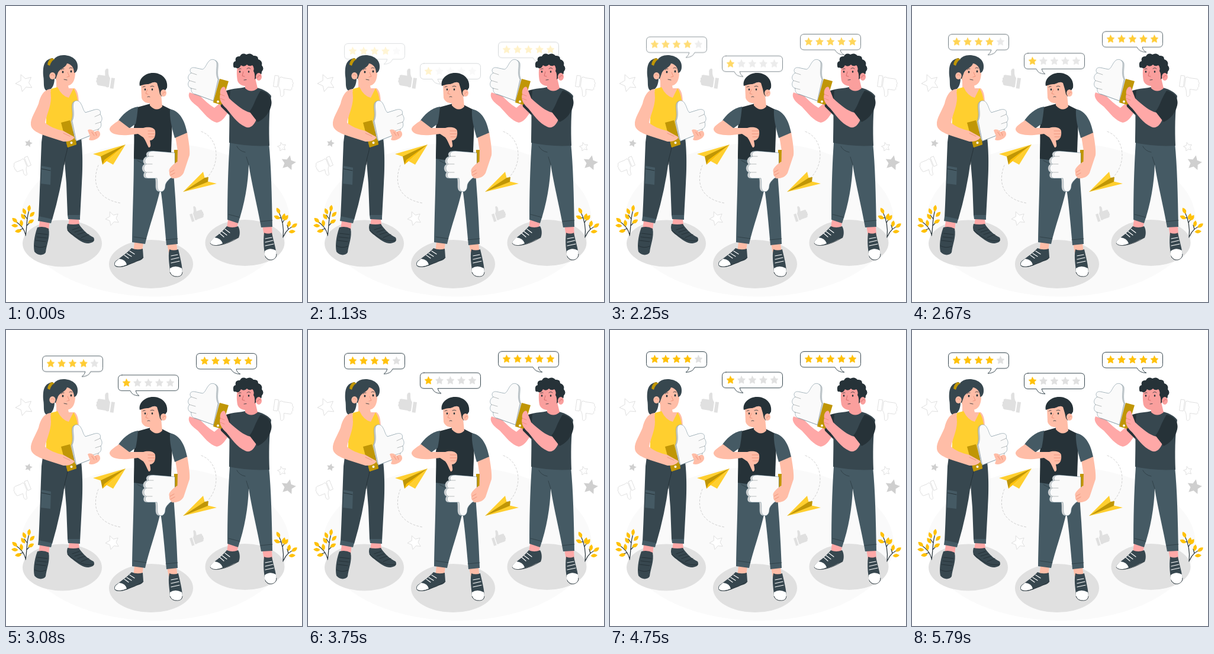
Write an HTML page without scripts that moves like this. It is 500 by 500 pixels and loops after 5.83 s.

```html
<!DOCTYPE html>
<html lang="en">
<head>
<meta charset="utf-8">
<title>Customer ratings</title>
<style>
html, body { margin: 0; width: 100%; height: 100%; overflow: hidden; background: #fff; }
svg { display: block; width: 100vw; height: 100vh; }
path, ellipse, use { stroke-linecap: round; stroke-linejoin: round; }
.floor { fill: #fafafa; }
.grey { fill: #e0e0e0; }
.silver { fill: #cfcfcf; }
.line { fill: #fff; stroke: #e0e0e0; }
.dash { fill: none; stroke: #d0d0d0; stroke-dasharray: 3 3; }
.gold { fill: #ffc107; }
.sun { fill: #ffcf2f; }
.ochre { fill: #c09606; }
.ink { fill: #263238; }
.slate { fill: #37474f; }
.steel { fill: #455a64; }
.skin { fill: #ffbda7; }
.pink { fill: #ffa8a7; }
.blush { fill: #fa9f9d; }
.white { fill: #fff; }
.glove { fill: #fafafa; stroke: #607d8b; stroke-width: .5; }
.rim { fill: #d9d9d9; stroke: #607d8b; stroke-width: .5; }
.pen { fill: none; stroke: #263238; stroke-width: .8; }
.soft { fill: none; stroke: #e5846c; stroke-width: .7; }
.lace { fill: none; stroke: #fff; stroke-width: 1.2; }
.seam { fill: none; stroke: #263238; stroke-width: 1; }
.stem { fill: none; stroke: #263238; stroke-width: 1.2; }
.box { fill: #fff; stroke: #37474f; stroke-width: 1; }
.bubble .gold { stroke: #ffc107; }
.bubble .grey { stroke: #e0e0e0; }

/* each bubble rises 30px with a slight overshoot */
.bubble { animation: 5.83s cubic-bezier(.35, .07, .5, 1.37) infinite; }
.b1 { animation-name: rise1; }
.b2 { animation-name: rise2; }
.b3 { animation-name: rise3; }
@keyframes rise1 { 0% { opacity: 0; transform: translateY(30px); } 100% { opacity: 1; transform: none; } }
@keyframes rise2 { 0% { opacity: 0; transform: translateY(30px); } 91.4%, 100% { opacity: 1; transform: none; } }
@keyframes rise3 { 0% { opacity: 0; transform: translateY(30px); } 87.1%, 100% { opacity: 1; transform: none; } }
</style>
</head>
<body>
<svg viewBox="0 0 500 500" xmlns="http://www.w3.org/2000/svg">
<defs>
  <path id="star" vector-effect="non-scaling-stroke" d="M0-10 2.9-4 9.5-3.1 4.8 1.5 5.9 8.1 0 5-5.9 8.1-4.8 1.5-9.5-3.1-2.9-4Z"/>
  <use id="rate" href="#star" transform="scale(.66)" stroke-width="1"/>
  <path id="thumb" vector-effect="non-scaling-stroke" d="M0 0H6V18H0ZM8 1C12-3 12-8 13-13C15-16 19-13 18-8L17-2H27Q31-1 29 2Q32 4 30 7Q32 10 29 12Q29 16 25 16H14Q10 18 8 16Z"/>
  <path id="leaf" d="M0-6Q6 0 0 5.500Q-6 0 0-6Z"/>
  <path id="g1" d="M112 194C117 183 112 172 114 164C116 158 123 159 126 164C130 170 130 176 134 180L150 175C158 173 161 178 159 183C163 187 163 193 160 196C162 202 160 206 156 208C156 214 151 217 147 217L119 228Z"/>
  <path id="g2" d="M284 248 248 245C238 245 238 251 240 254C233 256 232 264 236 267C230 270 231 279 236 281C232 286 235 292 241 291L254 291C256 300 253 308 257 312C262 316 268 312 268 304C268 298 276 290 284 287Z"/>
  <path id="g3" d="M358 124C353 114 357 104 356 96C354 89 346 89 343 93C338 98 337 105 332 107L318 104C311 103 309 110 313 113C307 116 306 123 310 126C306 130 307 138 313 139C312 144 315 149 320 149L350 160Z"/>
</defs>

<ellipse class="floor" cx="252" cy="361" rx="227" ry="130"/>
<g class="grey">
  <ellipse cx="95" cy="401" rx="67" ry="39.5"/>
  <ellipse cx="245" cy="436" rx="71" ry="41"/>
  <ellipse cx="403.500" cy="400" rx="67" ry="39"/>
  <use href="#thumb" transform="translate(184 122) rotate(8) scale(-1 1)"/>
  <use href="#thumb" transform="translate(310 352) rotate(-18) scale(.75)"/>
</g>

<g class="line">
  <use href="#star" transform="translate(31 130) rotate(-22) scale(1.5)"/>
  <use href="#star" transform="translate(180 359) rotate(-22) scale(1.2)"/>
  <use href="#star" transform="translate(466 238) rotate(-12) scale(.75)"/>
  <use href="#thumb" transform="translate(42 269) rotate(-22) scale(-.9)"/>
  <use href="#thumb" transform="translate(452 136) rotate(8) scale(1.05 -1.05)"/>
</g>
<g class="silver">
  <use href="#star" transform="translate(38 232) rotate(14) scale(.68)"/>
  <use href="#star" transform="translate(477 265) rotate(12) scale(1.3)"/>
</g>

<path class="dash" d="M156 269C145 297 152 326 194 333M330 212C361 224 362 268 339 290"/>
<path class="sun" d="M202 234 147 250 162 255ZM202 234 170 262 181 268ZM299 314 333 280 336 292ZM299 314 339 296 356 300Z"/>
<path class="gold" d="M202 234 164 257 163 268 170 262Z"/>
<path class="ochre" d="M202 234 160 254 163 268 166 260ZM299 314 336 290 342 289 341 297Z"/>

<!-- plants -->
<path class="stem" d="M33 388C36 372 34 356 40 342M33 386C30 374 23 368 15 363M36 360 31 353M35 371 41 365M29 376 20 379M468 391C470 374 466 358 460 346M469 389C473 378 480 375 488 370M467 366 472 358M464 358 457 356M477 377 475 370"/>
<g class="gold">
  <use href="#leaf" transform="translate(39 342) rotate(8)"/>
  <use href="#leaf" transform="translate(31 347) rotate(-22)"/>
  <use href="#leaf" transform="translate(44 352) rotate(45)"/>
  <use href="#leaf" transform="translate(29 356) rotate(-35)"/>
  <use href="#leaf" transform="translate(42 364) rotate(60)"/>
  <use href="#leaf" transform="translate(15 362) rotate(-50)"/>
  <use href="#leaf" transform="translate(26 367) rotate(-8)"/>
  <use href="#leaf" transform="translate(15 371) rotate(-85)"/>
  <use href="#leaf" transform="translate(21 380) rotate(-100)"/>
  <use href="#leaf" transform="translate(460 346) rotate(-28)"/>
  <use href="#leaf" transform="translate(458 357) rotate(-65)"/>
  <use href="#leaf" transform="translate(469 356) rotate(18)"/>
  <use href="#leaf" transform="translate(473 358) rotate(35)"/>
  <use href="#leaf" transform="translate(478 368) rotate(12)"/>
  <use href="#leaf" transform="translate(487 371) rotate(55)"/>
  <use href="#leaf" transform="translate(483 381) rotate(85)"/>
</g>

<!-- speech bubbles -->
<g class="bubble b1">
  <path class="box" d="M68 38.500H157Q163.500 38.500 163.500 45V58.500Q163.500 65 157 65H143Q140 73 128 73.500Q133 70 134 65H68Q61.500 65 61.500 58.500V45Q61.500 38.500 68 38.500Z"/>
  <g class="gold">
    <use href="#rate" x="75.500" y="51.500"/><use href="#rate" x="94" y="51.500"/><use href="#rate" x="112.500" y="51.500"/><use href="#rate" x="131" y="51.500"/>
  </g>
  <use class="grey" href="#rate" x="149.500" y="51.500"/>
</g>
<g class="bubble b2">
  <path class="box" d="M196 73H285Q291.500 73 291.500 79.500V93Q291.500 99.500 285 99.500H219Q220 105 225 108Q213 108 210 99.500H196Q189.500 99.500 189.500 93V79.500Q189.500 73 196 73Z"/>
  <use class="gold" href="#rate" x="203.500" y="86.500"/>
  <g class="grey">
    <use href="#rate" x="222" y="86.500"/><use href="#rate" x="240.500" y="86.500"/><use href="#rate" x="259" y="86.500"/><use href="#rate" x="277.500" y="86.500"/>
  </g>
</g>
<g class="bubble b3">
  <path class="box" d="M328 37.500H417Q423.500 37.500 423.500 44V57.500Q423.500 64 417 64H389Q390 70 396 72.500Q384 72.500 380 64H328Q321.500 64 321.500 57.500V44Q321.500 37.500 328 37.500Z"/>
  <g class="gold">
    <use href="#rate" x="335.500" y="50.500"/><use href="#rate" x="354" y="50.500"/><use href="#rate" x="372.500" y="50.500"/><use href="#rate" x="391" y="50.500"/><use href="#rate" x="409.500" y="50.500"/>
  </g>
</g>

<!-- woman -->
<g>
  <path class="slate" d="M79 88C64 90 62 102 63 118C65 130 62 138 68 143C77 143 82 134 82 122L82 96Z"/>
  <path class="pink" d="M57 362H74L72 379H55ZM107 358H123L124 371H105Z"/>
  <path class="slate" d="M53 374C47 390 46 406 48 415C53 422 64 422 67 416C68 404 75 390 72 376Q63 371 53 374ZM104 368C101 378 105 382 112 387C122 395 130 401 139 401C147 400 151 397 148 391C138 386 129 378 123 368Q114 370 104 368Z"/>
  <path class="seam" d="M53 384 70 386M52 390 69 392M50 396 67 398M48 405Q57 410 67 406M112 378 124 374M116 382 129 378M121 386 134 382M127 391 140 386M104 379C118 390 129 399 148 396"/>
  <path class="slate" d="M63 207 124 205C130 230 130 270 128 300L125 357 104 354 102 300 99 262Q93 310 78 361L55 357C57 320 58 280 60 230Z"/>
  <path class="steel" d="M55 355 78 360 76 367 54 363ZM104 353 125 353 125 361 105 360ZM60 270 76 273 75 302 59 300Z"/>
  <path class="seam" d="M104 236C104 247 99 254 98 268M60 275 75 278"/>
  <path class="skin" d="M85 120 104 130 106 139 116 139C124 145 124 165 121 185L110 180 100 165 74 142 85 138Z"/>
  <path class="sun" d="M76 140C73 155 74 165 69 180C67 195 68 203 68 214L122 212 121 160C120 152 118 145 114 139L106 155Q94 152 87 137Z"/>
  <path class="skin" d="M86 107C88 97 100 94 106 96C114 97 117 104 117 112C117 126 112 134 103 135C93 135 86 130 83 122Z"/>
  <path class="slate" d="M77 114C74 94 82 83 97 83C112 83 122 92 121 103C121 109 118 113 115 113C115 104 110 98 103 97C101 104 91 106 88 112L84 123C79 122 77 118 77 114Z"/>
  <ellipse class="skin" cx="78.500" cy="118" rx="5.200" ry="6"/>
  <path class="ochre" d="M77 88 82 90Q76 93 74 101L70 99Q71 91 77 88Z"/>
  <path class="pen" d="M93 108Q95 105 98 106M107 105Q109 103 112 105M98 124 103 125"/>
  <path class="soft" d="M104 112 107 119 103 120M76 117Q79 114 81 118"/>
  <ellipse class="ink" cx="96" cy="111.500" rx="1.400" ry="1.900"/><ellipse class="ink" cx="110" cy="110.500" rx="1.400" ry="1.900"/>
  <use class="rim" href="#g1" x="-2" y="1"/>
  <use class="glove" href="#g1"/>
  <path class="pen" stroke-opacity=".4" d="M150 187 159 183M151 199 160 196M147 211 156 208"/>
  <path class="ochre" d="M93 197 108 193 119 234 104 239Z"/>
  <path class="skin" d="M138 210C141 207 147 209 150 213C155 208 160 212 159 218C157 224 147 229 140 226L142 220ZM75 140C63 142 58 152 55 165C50 178 41 190 42 200C42 210 56 216 72 221L97 229C108 230 117 224 115 221L97 211C84 208 72 203 66 197C68 185 76 170 76 155Z"/>
  <path class="soft" d="M145 213 149 219M151 213 153 219M97 215 108 220"/>
  <path class="ochre" d="M102 231 118 226 119 234 104 239Z"/>
  <circle class="white" cx="110.500" cy="231" r="2"/>
</g>

<!-- man in the middle -->
<g>
  <path class="skin" d="M217 399H232L230 416H215ZM272 401H288L290 417H275Z"/>
  <path class="slate" d="M212 409C204 418 194 424 185 431C181 436 183 441 190 441C202 441 209 436 217 433C223 430 231 430 232 424L231 410Q221 413 212 409ZM276 411C273 425 277 440 277 450C280 458 292 459 297 454C300 445 294 425 291 411Q283 414 276 411Z"/>
  <path class="white" d="M191 427Q202 428 204 437Q196 441 189 440Q181 440 185 432ZM277 443Q286 437 297 443Q300 455 292 457Q280 458 277 449Z"/>
  <path class="lace" d="M200 421 207 426M204 418 212 423M209 414 217 419M279 422 290 420M279 428 292 425M279 434 293 431"/>
  <path class="pen" d="M184 438Q188 442 197 440L217 433 232 425M277 450Q280 458 290 457Q297 457 298 450"/>
  <path class="steel" d="M216 250 280 248C285 300 288 350 290 402L271 404C268 370 265 335 261 308C254 340 241 375 235 402L213 399C214 340 216 300 216 250Z"/>
  <path class="seam" stroke-opacity=".6" d="M216 390 237 393M270 395 290 393M222 261 235 268"/>
  <path class="skin" d="M286 220 306 213C309 230 311 245 310 252L300 282C296 290 286 292 280 291C273 287 274 280 279 276L288 266 290 245Z"/>
  <path class="ink" d="M222 171 244 165Q254 174 263 167L279 175C282 190 280 215 279 249Q266 265 245 262L216 258C216 240 217 225 216 205Z"/>
  <path class="skin" d="M243 158 262 150 264 170Q254 180 243 168Z"/>
  <path class="steel" d="M223 170C208 172 196 184 189 195L208 207 219 199C221 190 222 180 223 170ZM277 174C295 178 302 195 306 214L285 223C280 205 276 190 277 174Z"/>
  <path class="skin" d="M191 193C182 199 174 204 175 209C177 217 192 219 206 218L223 216 232 222C236 227 238 234 241 239Q245 239 244 233L243 227C250 227 253 220 252 211C250 204 238 204 232 206L208 206Z"/>
  <path class="soft" d="M251 211H240M252 216H240M251 221H241"/>
  <path class="skin" d="M228 132 229 155C231 162 238 165 245 164C254 162 260 156 262 150L257 128Z"/>
  <path class="ink" d="M226 135C223 123 236 112 250 113C266 114 274 126 272 138L268 144 263 153 260 149 258 140 255 130C249 126 244 132 239 132Q234 132 226 135Z"/>
  <ellipse class="skin" cx="266" cy="147" rx="5" ry="6"/>
  <path class="pen" d="M231 137Q233 135 235 136M244 136Q247 134 250 136M239 153.500Q241 152 243 153.500"/>
  <path class="soft" d="M239 141 236 148 240 149M265 149Q266 144 269 146"/>
  <ellipse class="ink" cx="235" cy="141" rx="1.300" ry="1.800"/><ellipse class="ink" cx="247" cy="141" rx="1.300" ry="1.800"/>
  <path class="ochre" d="M284 243 290 243 289 281 284 286Z"/>
  <use class="rim" href="#g2" x="-2"/>
  <use class="glove" href="#g2" x="1"/>
  <path class="pen" stroke-opacity=".4" d="M241 254H249M237 267H247M237 281H247"/>
  <path class="skin" d="M289 263C282 268 273 275 276 281C275 287 279 291 286 291L298 284 300 268Z"/>
  <path class="soft" d="M277 281 284 277M278 286 285 282"/>
</g>

<!-- man on the right -->
<g>
  <path class="pink" d="M375 361 392 365 390 378 373 375ZM433 371H449L450 388H436Z"/>
  <path class="slate" d="M373 372C364 383 352 391 346 397C343 403 350 405 360 404C372 402 382 396 393 391C396 386 395 376 392 372Q382 376 373 372ZM436 383C434 400 436 412 438 424C442 431 453 430 457 423C457 412 452 398 449 383Q443 386 436 383Z"/>
  <path class="white" d="M352 391Q363 392 366 401Q357 405 350 404Q343 402 346 397ZM437 414Q446 407 456 413Q459 425 452 428Q440 431 437 420Z"/>
  <path class="lace" d="M361 384 368 390M365 381 373 387M370 377 378 383M438 393 449 391M438 399 451 396M438 405 452 402"/>
  <path class="pen" d="M345 401Q349 406 360 404Q375 402 393 391M438 423Q441 430 449 429Q457 427 457 419"/>
  <path class="steel" d="M378 230 444 231C448 270 449 320 450 373L431 374C425 340 415 300 410 268C409 300 403 335 392 367L374 361C374 320 375 275 378 230Z"/>
  <path class="seam" stroke-opacity=".6" d="M376 352 395 357M430 364 450 362M390 237Q394 245 404 247M410 268 406 255"/>
  <path class="pink" d="M310 146C305 155 316 164 324 170C335 182 344 194 356 197C364 196 370 188 376 178L366 160 352 172C342 166 334 158 328 152Z"/>
  <path class="ink" d="M380 141C370 143 362 146 360 151L363 170 378 185 388 160Z"/>
  <path class="slate" d="M379 141C388 139 396 139 404 137Q414 144 424 138C436 141 444 146 448 152C444 180 444 210 445 236Q410 238 377 231C377 215 378 190 377 170Z"/>
  <path class="blush" d="M403 128 421 122 425 139Q414 148 404 139Z"/>
  <path class="blush" d="M391 100C389 112 390 120 391 126C393 133 402 137 408 134C416 132 421 127 423 120L422 98Z"/>
  <path class="ink" d="M384 101Q383 94 388 93Q386 85 395 85Q399 78 406 82Q413 78 418 84Q426 83 426 90Q434 93 432 100Q437 106 432 111Q432 117 427 118L420 124Q421 114 418 110Q420 103 416 100Q411 103 407 99Q402 104 397 100Q393 108 388 104Q384 105 384 101Z"/>
  <ellipse class="blush" cx="427" cy="119.500" rx="5" ry="6.500"/>
  <path class="pen" d="M393 107Q395 105 397 106M407 106Q410 103 413 106M402 125 406 124.500"/>
  <path fill="none" stroke="#c9605f" stroke-width=".8" d="M401 111 399 118 403 119M425 121Q426 116 430 118"/>
  <ellipse class="ink" cx="395" cy="111" rx="1.300" ry="1.800"/><ellipse class="ink" cx="410" cy="111" rx="1.300" ry="1.800"/>
  <use class="rim" href="#g3" x="2" y="1"/>
  <use class="glove" href="#g3"/>
  <path class="pen" stroke-opacity=".4" d="M313 113 322 116M310 126 320 129M313 139 321 141"/>
  <path class="ochre" d="M361 123 376 127 364 167 350 163Z"/>
  <circle class="white" cx="358" cy="161.500" r="2"/>
  <path class="pink" d="M424 188C420 202 412 208 404 204C390 198 380 182 372 173C364 166 359 157 362 149C360 141 367 133 370 138L377 156C390 168 402 178 413 180Z"/>
  <path class="soft" d="M362 149 369 152M362 156 369 159"/>
  <path class="ink" d="M430 143C444 145 451 158 448 168C444 184 434 192 425 196L411 178C418 172 420 158 430 143Z"/>
</g>
</svg>
</body>
</html>
```
